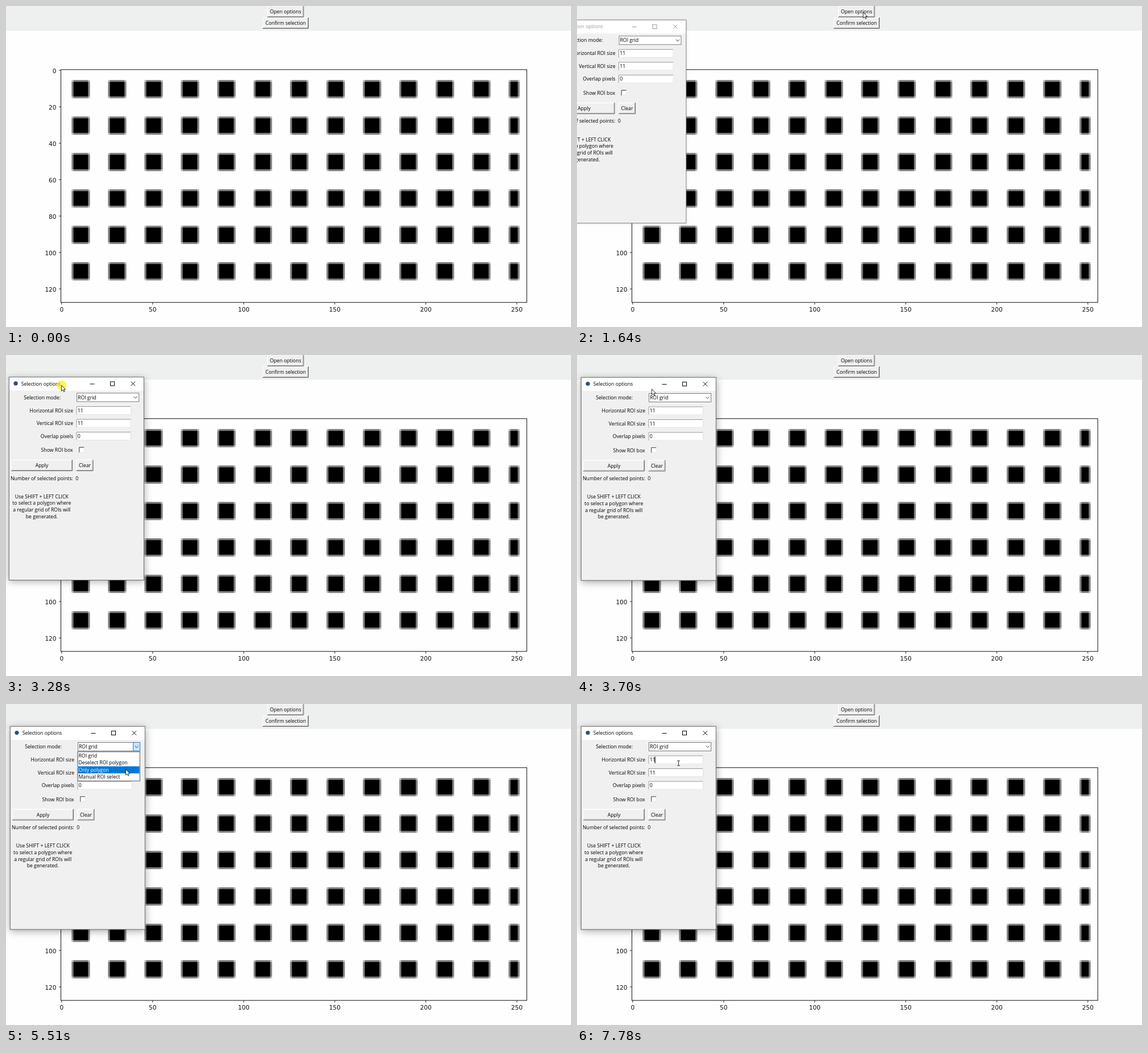
These frames come from a looping animation (993 px wide and 564 px high, 8000 ms). An HTML page with a canvas:

```html
<!DOCTYPE html>
<html lang="en">
<head>
<meta charset="utf-8">
<title>Selection options</title>
<style>
  html, body { margin: 0; width: 100%; height: 100%; overflow: hidden; background: #fefefe; }
  canvas { display: block; }
</style>
</head>
<body>
<canvas id="stage" width="993" height="564"></canvas>
<script>
const ctx = document.getElementById('stage').getContext('2d');
const UI = '8.7px "Open Sans", sans-serif';
const BLUE = '#0078d7';

// The screen is refreshed once per tick; all times below are in ticks.
const LOOP = 8000, TICK = 204.5;
const ENTER = 3, OPENED = 8, GRAB = 15, RELEASE = 18, HOVER = 21, DROP = 22, PICK = 33, TYPE = 38;

// Pointer glides; power 1 is linear, 3 slows down towards the end.
const start = { x: 733, y: 150 };
const dropPoint = { x: 99.5, y: 53.7 };
const glides = [
  { from: ENTER, to: 7, x: 503, y: 11, power: 3 },
  { from: 10, to: 14, x: 47, y: 39, power: 3 },
  { from: 14, to: 17, ...dropPoint, power: 3 },
  { from: 17, to: HOVER, x: 227, y: 78, power: 1 },
  { from: 23, to: 27, x: 205, y: 127, power: 1 },
  { from: 27, to: 31, x: 210, y: 90, power: 1 },
  { from: 34, to: 37, x: 178.5, y: 104, power: 1 }
];

function pointerAt(tick) {
  return glides.reduce((p, g) => {
    const k = Math.max(0, Math.min(1, (tick - g.from) / (g.to - g.from)));
    const e = 1 - (1 - k) ** g.power;
    return { x: p.x + (g.x - p.x) * e, y: p.y + (g.y - p.y) * e };
  }, start);
}

// The window hangs on the pointer while it is dragged to its resting place.
function windowShift(tick) {
  const p = pointerAt(Math.max(14, Math.min(17, tick)));
  return [p.x - dropPoint.x, p.y - dropPoint.y];
}

function box(x, y, w, h, fill) {
  ctx.fillStyle = fill;
  ctx.fillRect(x, y, w, h);
}

function frame(x, y, w, h, color, width = 1) {
  ctx.strokeStyle = color;
  ctx.lineWidth = width;
  ctx.strokeRect(x, y, w, h);
}

function line(color, ...points) {
  ctx.strokeStyle = color;
  ctx.lineWidth = 1;
  ctx.beginPath();
  for (let i = 0; i < points.length; i += 2) ctx.lineTo(points[i], points[i + 1]);
  ctx.stroke();
}

function disc(x, y, r, fill) {
  ctx.fillStyle = fill;
  ctx.beginPath();
  ctx.arc(x, y, r, 0, 7);
  ctx.fill();
}

function text(s, x, y, align = 'left', color = '#000', font = UI) {
  ctx.font = font;
  ctx.textAlign = align;
  ctx.fillStyle = color;
  ctx.fillText(s, x, y + 3.1);
}

// Two-tone edge: one colour on the left and top, another on the right and bottom
function bevel(x, y, w, h, light, dark) {
  line(light, x + .5, y + h, x + .5, y + .5, x + w, y + .5);
  line(dark, x, y + h - .5, x + w - .5, y + h - .5, x + w - .5, y);
}

function button(label, x, y, w, h) {
  box(x, y, w, h, '#f0f0f0');
  bevel(x, y, w - 1, h - 1, '#fff', '#a8a8a8');
  bevel(x, y, w, h, '#fff', '#6c6c6c');
  text(label, x + w / 2, y + h / 2, 'center');
}

function sunken(x, y, w, h) {
  box(x, y, w, h, '#fff');
  bevel(x, y, w, h, '#969696', '#e3e3e3');
}

function plot() {
  const left = 96.2, top = 110.9, cell = 3.2;
  const px = i => left + i * cell, py = i => top + i * cell;
  for (let r = 0; r < 6; r++) {
    for (let c = 0; c < 13; c++) {
      const n = c < 12 ? 10 : 6;
      const block = (dx, dy, fill) =>
        box(px(6 + 20 * c + dx), py(6 + 20 * r + dy), (n - 2 * dx) * cell, (10 - 2 * dy) * cell, fill);
      block(0, 0, '#bcbcbc');
      block(1, 0, '#808080');
      block(0, 1, '#808080');
      block(1, 1, '#000');
    }
  }
  frame(96.5, 111.8, 818.8, 409, '#222', 1.1);
  const tickFont = '10.6px "DejaVu Sans", sans-serif';
  for (let v = 0; v <= 250; v += 50) {
    const x = px(v + .5);
    line('#222', x, 521, x, 524.5);
    text(v, x, 533.7, 'center', '#111', tickFont);
  }
  for (let v = 0; v <= 120; v += 20) {
    const y = py(v + .5) + .6;
    line('#222', 93, y, 96.5, y);
    text(v, 88.6, y + 1.5, 'right', '#111', tickFont);
  }
}

function combobox(tick) {
  const selected = tick >= PICK && tick < TYPE;
  box(126, 67, 110, 16, '#fff');
  frame(126.5, 67.5, 109, 15, selected ? BLUE : '#7a7a7a');
  if (tick >= HOVER && tick < PICK) {
    box(223, 67, 13, 16, '#cce4f7');
    frame(223.5, 67.5, 12, 15, '#2f7fbd');
  }
  line('#444', 226.5, 73.5, 229.5, 76.7, 232.5, 73.5);
  if (selected) box(128, 69, 35, 12, BLUE);
  text('ROI grid', 128, 75, 'left', selected ? '#fff' : '#000');
}

function dropdown(pointerY) {
  const items = ['ROI grid', 'Deselect ROI polygon', 'Only polygon', 'Manual ROI select'];
  const top = 84.8, row = 12.35;
  const active = Math.max(0, Math.floor((pointerY - top) / row));
  box(126, 84, 109.3, 51.2, '#fff');
  frame(126, 84, 109.3, 51.2, '#555');
  items.forEach((item, i) => {
    const y = top + i * row;
    if (i === active) box(127, y, 107.5, row, BLUE);
    text(item, 127.5, y + row / 2, 'left', i === active ? '#fff' : '#000');
  });
}

function optionsWindow(tick, pointerY) {
  const active = tick >= GRAB, ink = active ? '#000' : '#999';
  ctx.save();
  ctx.shadowColor = `rgba(0,0,0,${active ? .35 : .22})`;
  ctx.shadowBlur = active ? 13 : 5;
  ctx.shadowOffsetY = active ? 3 : 1;
  box(7, 39, 237.5, 357, '#f0f0f0');
  ctx.restore();
  box(7, 39, 237.5, 24, '#fff');
  frame(7.3, 39.3, 237, 356.8, active ? '#666' : '#858585');

  disc(19, 50.5, 3.6, '#2f4f73');
  text('Selection options', 28.7, 51, 'left', ink);
  line(ink, 149.5, 51.5, 157.5, 51.5);
  frame(185.5, 47.5, 7, 7, ink);
  line(ink, 221.7, 47.3, 229, 54.7);
  line(ink, 229, 47.3, 221.7, 54.7);

  text('Selection mode:', 98, 75, 'right');
  combobox(tick);
  ['Horizontal ROI size', 'Vertical ROI size', 'Overlap pixels'].forEach((label, i) => {
    const y = 98 + i * 22.5;
    text(label, 120, y, 'right');
    sunken(125.5, y - 7.5, 96.5, 15);
    text(i < 2 ? '11' : '0', 127.7, y);
  });
  if (tick >= TYPE) box(136.5, 92.5, 1.2, 11.5, '#000');
  text('Show ROI box', 119.5, 167.5, 'right');
  sunken(130, 162, 9.5, 10);
  line('#555', 130.8, 171.5, 130.8, 162.8, 139, 162.8);
  button('Apply', 11, 184.5, 108, 20);
  button('Clear', 125.5, 184.5, 30, 20);
  text('Number of selected points:', 119.8, 217, 'right');
  text('0', 124.3, 217);
  ['Use SHIFT + LEFT CLICK', 'to select a polygon where', 'a regular grid of ROIs will', 'be generated.']
    .forEach((s, i) => text(s, 64.7, 249.2 + i * 11.65, 'center'));
  if (tick >= DROP && tick < PICK) dropdown(pointerY);
}

const arrowShape = new Path2D('M0 0V16.5L4 13 6.5 18.5 9 17.5 6.7 12H11.5Z');

function arrow(x, y) {
  ctx.save();
  ctx.translate(x, y);
  ctx.scale(.62, .62);
  ctx.fillStyle = '#fff';
  ctx.fill(arrowShape);
  ctx.strokeStyle = '#000';
  ctx.lineWidth = 1.3;
  ctx.stroke(arrowShape);
  ctx.restore();
}

function textCursor(x, y) {
  line('#333', x, y - 4, x, y + 4);
  for (const end of [y - 4.2, y + 4.2]) line('#333', x - 2.5, end, x + 2.5, end);
}

function draw() {
  const tick = Math.floor(performance.now() % LOOP / TICK);
  const { x, y } = pointerAt(tick);
  box(0, 0, 993, 564, '#fefefe');
  box(0, 0, 993, 43.5, '#eef0f0');
  button('Open options', 459, -.5, 64.5, 20.5);
  button('Confirm selection', 451, 20, 81, 20);
  plot();

  if (tick >= OPENED) {
    ctx.save();
    ctx.translate(...windowShift(tick));
    optionsWindow(tick, y);
    ctx.restore();
  }
  if (tick >= GRAB && tick < RELEASE) disc(x, y + .3, 9, 'rgba(252,236,20,.65)');
  if (tick > 34) textCursor(x, y);
  else if (tick >= ENTER) arrow(x, y);
  requestAnimationFrame(draw);
}
draw();
</script>
</body>
</html>
```
